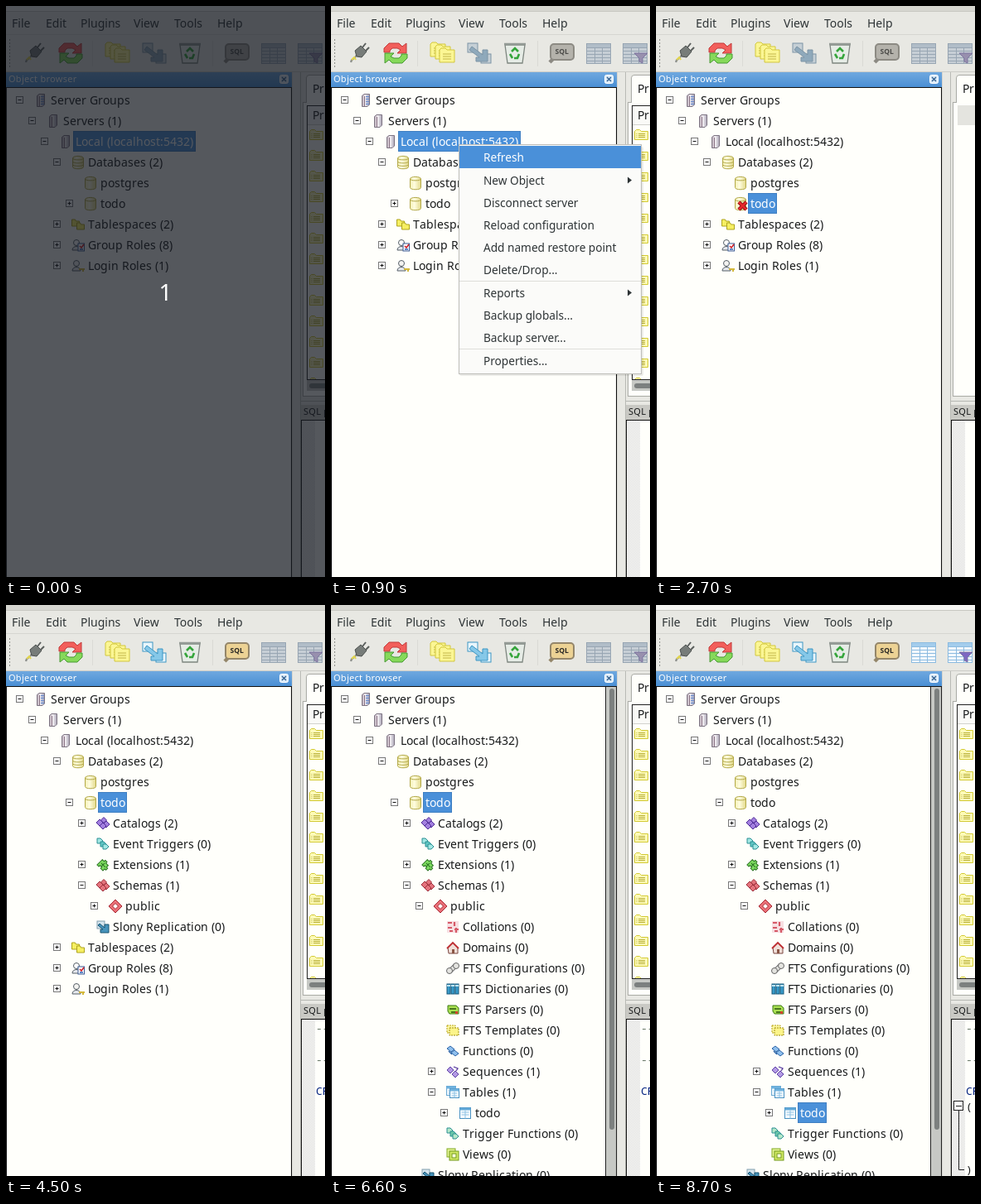
Animation, 385 px wide and 690 px high, one loop 8800 ms. Source, as an HTML page:

```html
<!DOCTYPE html>
<html lang="en">
<head>
<meta charset="utf-8">
<title>Object browser</title>
<style>
html, body { margin: 0; width: 100%; height: 100%; overflow: hidden; background: #e8e8e3; }
svg { display: block; width: 385px; height: 690px; }
text { font-family: "Noto Sans", "Open Sans", sans-serif; font-size: 14px; fill: #181a1b; white-space: pre; }
.bar { fill: #2e3436; }
.menu { font-size: 13.65px; fill: #2e3436; }
.small { font-size: 11px; letter-spacing: .28px; }
.code { font-family: "Noto Sans Mono", "DejaVu Sans Mono", monospace; font-size: 13px; }
.sel { fill: #fff; }
</style>
</head>
<body>
<svg id="stage" viewBox="0 0 385 690">
  <defs>
    <linearGradient id="blue" x2="0" y2="1"><stop stop-color="#6fa8df"/><stop offset="1" stop-color="#4a8fd4"/></linearGradient>
    <linearGradient id="can"><stop stop-color="#f4f0b4"/><stop offset=".4" stop-color="#fffde0"/><stop offset="1" stop-color="#e2d98a"/></linearGradient>
    <linearGradient id="steel"><stop stop-color="#b9a9b6"/><stop offset=".45" stop-color="#f4f1f4"/><stop offset="1" stop-color="#a9a3b4"/></linearGradient>
    <pattern id="check" width="2" height="2" patternUnits="userSpaceOnUse">
      <path fill="#fff" d="M0 0h2v2H0z"/><path fill="#d9d9d6" d="M0 0h1v1H0zM1 1h1v1H1z"/>
    </pattern>
    <clipPath id="list"><path d="M364 121h21v330h-21z"/></clipPath>
  </defs>
</svg>
<script>
const LOOP = 8800;
const stage = document.getElementById('stage');
const pen = document.createElement('canvas').getContext('2d');
pen.font = '14px "Noto Sans", "Open Sans", sans-serif';

const rect = (x, y, w, h, fill, more = '') => `<rect x="${x}" y="${y}" width="${w}" height="${h}" fill="${fill}" ${more}/>`;
const path = (d, fill = 'none', stroke = 'none', w = 1, more = '') => `<path d="${d}" fill="${fill}" stroke="${stroke}" stroke-width="${w}" ${more}/>`;
const text = (x, y, s, cls = '', more = '') => `<text x="${x}" y="${y}" class="${cls}" ${more}>${s}</text>`;
const at = (x, y, s) => `<g transform="translate(${x} ${y})">${s}</g>`;
const turn = (angle, s) => `<g transform="rotate(${angle})">${s}</g>`;
const on = (from, to, s) => `<g data-from="${from}" data-to="${to}">${s}</g>`;
const range = (n, f) => Array.from({ length: n }, (_, i) => f(i)).join('');

// Tree labels advance by whole pixels, as hinted text does
function label(x, y, s, cls) {
  const stops = [...s].map(c => {
    const here = x;
    x += Math.round(pen.measureText(c).width);
    return here;
  });
  return text(stops.join(' '), y, s, cls);
}

// Small icons, drawn around their centre
const tower = path('M-4.5-5.5L-2-7.5H4.5V5L2 7.5H-4.5Z', 'url(#steel)', '#7d7482') + path('M-1.5-5V7', 'none', '#8a7385');
const can = path('M-6.5-5C-6.5-8.5 6.5-8.5 6.5-5V5.5C6.5 8.5-6.5 8.5-6.5 5.5Z', 'url(#can)', '#b3a94a') + path('M-6.5-5C-6.5-2.5 6.5-2.5 6.5-5', 'none', '#b3a94a');
const gem = (x, y, r, fill, line) => path(`M${x} ${y - r}L${x + r} ${y}L${x} ${y + r}L${x - r} ${y}Z`, fill, line);
const gems = (fill, line) => gem(-4, -1, 4, fill, line) + gem(1, -4, 3.5, fill, line) + gem(4, 1, 4, fill, line) + gem(0, 3, 4, fill, line);
const sheet = (x, y, w, h, head, line) => rect(x, y, w, h, '#f4fafe', `stroke="${line}"`) + rect(x, y, w, 3, head)
  + path(`M${x + 2} ${y + 5.5}h${w - 4}M${x + 2} ${y + 8.5}h${w - 4}M${x + w / 2} ${y + 3}v${h - 3}`, 'none', '#8fc3e4');
const person = (x, skin) => path(`M${x - 6} 6C${x - 6} 0 ${x + 4} 0 ${x + 4} 6Z`, '#e6e9ee', '#555e66')
  + `<circle cx="${x - 1}" cy="-3" r="3.5" fill="${skin}" stroke="#555e66"/>`;
const flags = (a, b) => [-4, 0, 3].map((p, i) => path(`M${p - 3} ${p - 3}h4l3 3l-3 3h-4z`, i % 2 ? b : a, '#2b8f92')).join('');
const folder = (x, y) => path(`M${x} ${y}h4l1 2h4v6h-9z`, '#f6ef62', '#aea41e');

const icons = {
  group: tower + path('M0-4.5H4M0-1.5H4M0 1.5H4M0 4.5H4', 'none', '#6f8fce', 1.4),
  server: tower,
  dbs: can + path('M-6.5-1C-6.5 1.5 6.5 1.5 6.5-1M-6.5 2.5C-6.5 5 6.5 5 6.5 2.5', 'none', '#b3a94a'),
  db: can,
  off: can + path('M-2-2L7 7M7-2L-2 7', 'none', '#8a0c0c', 4.5) + path('M-2-2L7 7M7-2L-2 7', 'none', '#e5282c', 2.5),
  space: folder(-7.5, -6) + folder(-1.5, -2),
  roles: person(-1, '#fff') + rect(0, -2, 7.5, 9, '#fff', 'stroke="#3a5a94"') + path('M2 1l2 2l3-4', 'none', '#d3222a', 1.6) + path('M2 5h4', 'none', '#2c62b8', 1.5),
  login: person(-1, '#f3f3f1') + path('M1 4h7M6 4v3', 'none', '#d3b83a', 2),
  catalog: gems('#a27fdf', '#4d2a96'),
  event: flags('#a2e8e4', '#62c9c6'),
  ext: turn(45, path('M-5-4h3v-2h3v2h4v3h2v3h-2v3h-4v-2h-3v2h-3z', '#7fdc62', '#2a7422') + path('M-3 0h7M0-3v6', 'none', '#2a7422')),
  schema: gems('#e4737d', '#9d2f3a'),
  pub: gem(0, 0, 8, '#ea7078', '#a82731') + gem(0, 0, 3.5, '#fff', '#a82731'),
  slony: rect(-7, -7, 9, 9, '#d6e5ee', 'stroke="#829fae"') + path('M-4-4L2 1V-3H7V7H-3V3H0L-6-2Z', '#4793bb', '#185471'),
  coll: rect(-7, -7, 14, 14, '#f7dfe2') + path('M-6-5h5M2-6v5M-6 1h5M-4 5h4M2 3h5M4 1v6', 'none', '#d65a68', 2.2),
  domain: path('M-6 0L0-6L6 0V7H-5Z', '#f0dfd8', '#7b4640') + path('M-7 1L0-6L7 1', 'none', '#bd2e32', 1.8) + rect(-1, 2, 3, 5, '#8b5645'),
  conf: path('M-4 4L4-4', 'none', '#555', 6) + path('M-4 4L4-4', 'none', '#e7e7e3', 4) + '<circle cx="4" cy="-3" r="3.5" fill="#e4e4e0" stroke="#666"/><circle cx="-4" cy="3" r="3.5" fill="#e4e4e0" stroke="#666"/>',
  dict: [-7, -2, 3].map(x => rect(x, -6, 4, 12, '#3a9bc9', 'stroke="#16587a"') + rect(x, -5, 4, 2, '#bfe5f3')).join(''),
  parser: path('M-6-5h10l3 3v7h-11l-2-3z', '#a9e052', '#3c7912') + path('M-4-1h8M-2 3h8', 'none', '#2d570e', 1.6) + rect(3, 2, 3, 3, '#d4412c'),
  templ: rect(-7, -6, 10, 9, '#fdf9a4', 'stroke="#b6a111" stroke-dasharray="2 1"') + rect(-4, -3, 11, 9, '#fbf48a', 'stroke="#a18f0b" stroke-dasharray="2 1"'),
  func: path('M-7-3l4-3l5 4l-4 3zM-2 2l4-3l5 4l-4 3z', '#8fc0ee', '#2a63a6') + path('M-5 0l4 4', 'none', '#2a63a6', 1.5),
  seq: gem(-3, -2, 4, '#b39ae4', '#5d40a4') + gem(3, 3, 4, '#b39ae4', '#5d40a4') + path('M1-6l5 2l-2 3', 'none', '#53369a', 1.3),
  tables: sheet(-7.5, -7.5, 11, 11, '#6fb2de', '#6aa9d2') + sheet(-3.5, -4.5, 11, 11, '#6fb2de', '#4a92c2'),
  table: sheet(-6.5, -6.5, 13, 13, '#62a9d8', '#4a92c2'),
  trig: flags('#b4e8c9', '#6fcbaa'),
  view: rect(-7, -7, 10, 10, '#e4f495', 'stroke="#82a924"') + rect(-4, -4, 11, 11, '#d2ea66', 'stroke="#739a1b"') + rect(-1, -1, 5, 5, '#f7fcdc', 'stroke="#739a1b"')
};

function expander(x, y, sign) {
  return rect(x - 4, y - 4, 8, 8, '#fff', 'stroke="#777"') + path(`M${x - 2} ${y}h4` + (sign === '+' ? `M${x} ${y - 2}v4` : ''), 'none', '#111');
}

function row([depth, icon, name, sign, selWidth], i) {
  const y = 114 + 25 * i, x = 15 * depth;
  return (sign ? expander(x + 16.5, y - .5, sign) : '')
    + at(x + 42, y, icons[icon])
    + (selWidth ? rect(x + 51.5, y - 12.5, selWidth - 1, 24, '#4a90d9', 'stroke="#3f7fc2"') : '')
    + label(x + 54, y + 5, name, selWidth ? 'sel' : '');
}

// level: 0 closed, 1 database, 2 schemas, 3 public, 4 tables
function tree(level, { pick = '', icon = 'db', sign = level ? '-' : '+' } = {}) {
  const open = n => level >= n ? '-' : '+';
  const rows = [
    [0, 'group', 'Server Groups', '-'],
    [1, 'server', 'Servers (1)', '-'],
    [2, 'server', 'Local (localhost:5432)', '-', pick === 'server' && 148],
    [3, 'dbs', 'Databases (2)', '-'],
    [4, 'db', 'postgres'],
    [4, icon, 'todo', sign, pick === 'db' && 35]
  ];
  if (level >= 1) rows.push([5, 'catalog', 'Catalogs (2)', '+'], [5, 'event', 'Event Triggers (0)'],
    [5, 'ext', 'Extensions (1)', '+'], [5, 'schema', 'Schemas (1)', open(2)]);
  if (level >= 2) rows.push([6, 'pub', 'public', open(3)]);
  if (level >= 3) rows.push([7, 'coll', 'Collations (0)'], [7, 'domain', 'Domains (0)'],
    [7, 'conf', 'FTS Configurations (0)'], [7, 'dict', 'FTS Dictionaries (0)'], [7, 'parser', 'FTS Parsers (0)'],
    [7, 'templ', 'FTS Templates (0)'], [7, 'func', 'Functions (0)'], [7, 'seq', 'Sequences (1)', '+'],
    [7, 'tables', 'Tables (1)', open(4)]);
  if (level >= 4) rows.push([8, 'table', 'todo', '+', pick === 'table' && 35]);
  if (level >= 3) rows.push([7, 'trig', 'Trigger Functions (0)'], [7, 'view', 'Views (0)']);
  if (level >= 1) rows.push([5, 'slony', 'Slony Replication (0)']);
  rows.push([3, 'space', 'Tablespaces (2)', '+'], [3, 'roles', 'Group Roles (8)', '+'], [3, 'login', 'Login Roles (1)', '+']);
  const thumb = 533 * 27 / rows.length;
  return rows.map(row).join('') + (level >= 3
    ? rect(331, 99, 14, 591, '#c6c8c4') + rect(331, 99, 1, 591, '#222') + rect(344, 99, 1, 591, '#222')
      + rect(336, 101, 6, thumb, '#7c807f', 'rx="3"')
    : '');
}

// Toolbar icons
const note = (x, y) => path(`M${x} ${y + 2}l2-2h5l2 2h9v15h-18z`, '#fbf694', '#d2c73c') + path(`M${x + 4} ${y + 7}h10M${x + 4} ${y + 10}h10M${x + 4} ${y + 13}h10`, 'none', '#c2b64a');
const plug = path('M-11 11C-10 5-6 8-4 2', 'none', '#8d908c', 2.2) + path('M-6-3L1-9L8-2L2 5L-4 4Z', '#777c79', '#4b4f4d')
  + path('M3-7l4-5M7-3l4-4', 'none', '#5b5f5d', 2) + path('M-10 8l3-3l2 3', 'none', '#e5d84e', 2);
const arc = (fill, line) => path('M-14-1V-6L-8-12H4L8-8L13-12V0H2L6-4L2-6H-4L-7-3V-1Z', fill, line);
const reload = arc('#f25f5b', '#c23a3a') + turn(180, arc('#86d95a', '#469a33'));
const link = (paper, arrow, line) => rect(-14, -12, 12, 11, paper, `stroke="${line}"`) + rect(2, 1, 12, 11, paper, `stroke="${line}"`)
  + path('M-9-8L4 2V-4H10V10H-4V5H0L-12-4Z', arrow, line);
const trash = path('M-12-10H12L9 12H-9Z', '#e6ece6', '#7d857f', 1.3) + path('M-13-11H13', 'none', '#949b96', 2.5)
  + path('M-4-2L0-6L4-2M5 1L3 6H-1M-3 6L-6 1', 'none', '#35a53b', 2.6);
const lens = (glass, ring, ink) => path('M-8 5L-14 11', 'none', ring, 4.5) + rect(-13, -11, 28, 19, glass, `rx="4" stroke="${ring}" stroke-width="2"`)
  + text(-7.5, 1, 'SQL', '', `style="font-size:8.5px;font-weight:700;fill:${ink}"`);
const grid = (paper, line, head) => rect(-14.5, -11.5, 29, 24, paper, `stroke="${line}"`) + rect(-14, -11, 28, 4, head)
  + path('M-14-6.5H14M-14-2.5H14M-14 1.5H14M-14 5.5H14M-14 9.5H14M-4.5-7V12M4.5-7V12', 'none', line);
const funnel = fill => path('M-1 0H15L9 6V12L5 10V6Z', fill, '#7d74a0');
const tables = (paper, line, head, cone) => at(323, 57, grid(paper, line, head)) + at(367, 57, grid(paper, line, head) + funnel(cone));

const toolbar = path('M4.5 40V75', 'none', '#8e908b', 1, 'stroke-dasharray="2 2"')
  + path('M104.5 42V73M249.5 42V73', 'none', '#dadad5')
  + on(8000, 8100, rect(58.5, 40.5, 41, 33, '#f3f3f0', 'rx="3" stroke="#b4b5b0"'))
  + at(35, 57, plug) + at(78, 57, reload) + note(120, 44) + note(126, 47) + note(131, 51)
  + on(0, 2800, at(179, 57, link('#c6d0d6', '#8fa9bb', '#7c94a5')))
  + on(2800, LOOP, at(179, 57, link('#e9f6fc', '#86c8e8', '#3c96c4')))
  + at(222, 57, trash)
  + on(0, 2800, at(278, 57, lens('#b4b2ab', '#8c8a83', '#4c4c49')))
  + on(2800, LOOP, at(278, 57, lens('#ecd294', '#94866a', '#2c2a26')))
  + on(0, 7400, tables('#c6ced5', '#98a6b3', '#b1bdc8', '#9890ae'))
  + on(7400, LOOP, tables('#f4f9fd', '#8cbbe0', '#a4cdec', '#7d68c2'));

const bars = rect(0, 0, 385, 690, '#e8e8e3') + rect(0, 0, 385, 6, '#f5f5f2')
  + on(600, 8700, rect(0, 0, 385, 6, '#d6d6d0', 'opacity=".5"')) + on(700, 8600, rect(0, 0, 385, 6, '#d6d6d0'))
  + rect(0, 6, 385, 1, '#c8c8c2') + rect(0, 34, 385, 1, '#d6d6d1') + rect(0, 79, 385, 1, '#cdcdc8')
  + [[7, 'File'], [48, 'Edit'], [90, 'Plugins'], [154, 'View'], [203, 'Tools'], [255, 'Help']].map(([x, s]) => text(x, 26, s, 'bar')).join('');

const browser = rect(0, 80, 345, 18, 'url(#blue)') + text(3, 92, 'Object browser', 'small sel')
  + rect(330.5, 83.5, 10, 10, '#dcebf8', 'rx="2" stroke="#fff"') + path('M333 86l5 5M338 86l-5 5', 'none', '#315f8e', 1.4)
  + rect(0, 98, 345, 592, '#111') + rect(1, 99, 343, 591, '#fffffb');

const listIcon = i => at(374, 156 + 25 * i,
  path('M-7.5-4.5l2-2h4l2 2h8v10h-16z', '#fdfab8', '#d3ca34') + path('M-3-1.5h8M-3 .5h8M-3 2.5h8M-5.5-1.5h1M-5.5 .5h1M-5.5 2.5h1', 'none', '#b9b03a'));
const list = rect(363, 120, 22, 332, '#222') + rect(364, 121, 21, 330, '#fffffb')
  + rect(364, 121, 21, 22, '#fafaf7') + rect(364, 143, 21, 1, '#d2d2cd') + label(370, 137, 'Pr', '')
  + `<g clip-path="url(#list)">${range(13, listIcon)}</g>`
  + rect(363, 452, 22, 13, '#c6c8c4') + rect(366, 456, 25, 6, '#7c807f', 'rx="3"');

const side = rect(345, 80, 1, 610, '#d3d3ce') + rect(355, 80, 1, 610, '#b9bab5')
  + rect(358, 116, 27, 356, '#a9aaa5') + rect(359, 117, 26, 354, '#fffffb')
  + path('M362.5 117V87Q362.5 83.5 366 83.5H386V117', '#fffffb', '#a9aaa5') + label(370, 105, 'Pr', '')
  + on(0, 2700, list) + on(2700, 2800, rect(364, 120, 21, 24, '#e4e4df')) + on(2800, LOOP, list)
  + rect(356, 477, 29, 1, '#b6b7b2') + rect(356, 482, 29, 18, '#c9c9c4') + text(359, 494, 'SQL pane', 'small')
  + rect(356, 500, 29, 190, '#111') + rect(357, 501, 28, 189, '#fffffb') + rect(357, 501, 16, 189, 'url(#check)')
  + on(2800, LOOP, text(374, 516, '--', 'code', 'style="fill:#657565"') + text(374, 554, '--', 'code', 'style="fill:#657565"')
    + text(374, 592, 'CREATE', 'code', 'style="fill:#00207f"'))
  + on(7400, LOOP, rect(359.5, 599.5, 11, 11, '#fff', 'stroke="#222"') + path('M362 605.5h7M365.5 611V682.5H372', 'none', '#222')
    + text(374, 611, '(', 'code') + text(374, 687, ')', 'code'));

const highlight = y => rect(155, y, 219, 27, '#4a90d9');
const arrow = (y, fill = '#2e3436') => path(`M358 ${y - 4}l5 4l-5 4z`, fill);
const items = [[188, 'Refresh'], [216, 'New Object'], [243, 'Disconnect server'], [270, 'Reload configuration'],
  [297, 'Add named restore point'], [324, 'Delete/Drop...'], [352, 'Reports'], [379, 'Backup globals...'],
  [406, 'Backup server...'], [434, 'Properties...']];
const refreshOn = highlight(169) + text(184, 188, 'Refresh', 'menu sel');
const popup = on(600, 1800,
  rect(155, 170, 222, 277, '#000', 'opacity=".08" rx="2"') + rect(154.5, 167.5, 220, 277, '#fbfbf9', 'stroke="#bdbdb8"')
  + items.map(([y, s]) => text(184, y, s, 'menu')).join('')
  + rect(155, 332, 219, 1, '#dededa') + rect(155, 414, 219, 1, '#dededa') + arrow(210.5) + arrow(346.5)
  + on(900, 1100, refreshOn) + on(1400, 1800, refreshOn)
  + on(1200, 1300, highlight(197) + text(184, 216, 'New Object', 'menu sel') + arrow(210.5, '#fff')));

const trees = [
  [0, 0, { pick: 'server' }],
  [1800, 0, { icon: 'off', sign: '' }],
  [2700, 0, { icon: 'off', sign: '', pick: 'db' }],
  [2800, 0, { pick: 'db' }],
  [3400, 1, { pick: 'db' }],
  [4500, 2, { pick: 'db' }],
  [5300, 3, { pick: 'db' }],
  [6600, 4, { pick: 'db' }],
  [7300, 4, { pick: 'table' }]
].map(([start, level, look], i, all) => on(start, i + 1 < all.length ? all[i + 1][0] : LOOP, tree(level, look))).join('');

const countdown = on(0, 200, rect(0, 0, 385, 690, 'rgb(20,24,32)', 'opacity=".72"')
  + text(192.5, 356, '1', 'sel', 'text-anchor="middle" style="font-size:28px"'));

stage.insertAdjacentHTML('beforeend', bars + toolbar + browser + trees + side + popup + countdown);

const timed = [...stage.querySelectorAll('[data-from]')].map(el => ({ el, from: +el.dataset.from, to: +el.dataset.to }));
const begin = performance.now();
function draw(now) {
  const t = Math.max(0, now - begin) % LOOP;
  for (const { el, from, to } of timed) el.style.display = t >= from && t < to ? '' : 'none';
  requestAnimationFrame(draw);
}
draw(begin);
</script>
</body>
</html>
```
